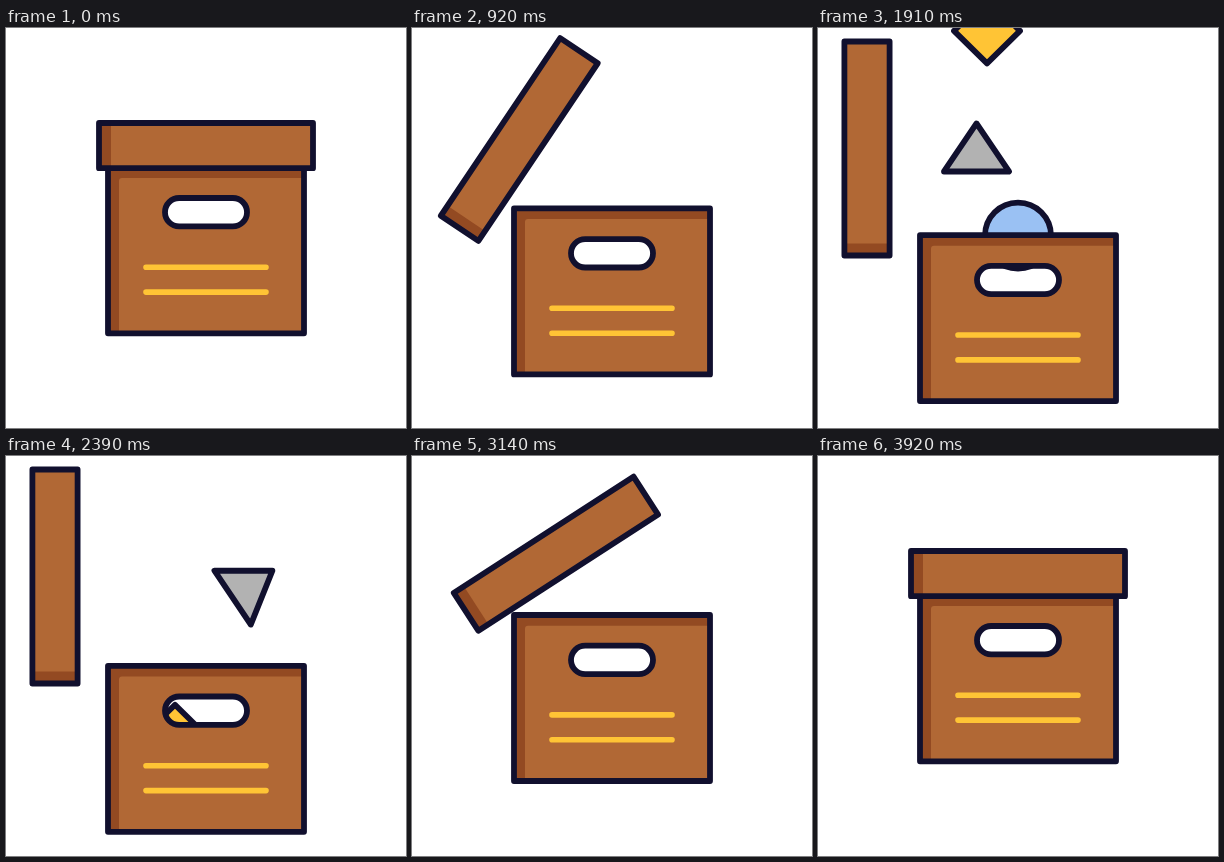
An HTML page for the animation above (3.95 s loop, 400 by 400 pixels).

```html
<!DOCTYPE html>
<html lang="en">
<head>
<meta charset="utf-8">
<title>Archive box</title>
<style>
  html, body { margin: 0; width: 100%; height: 100%; overflow: hidden; background: #fff; }
  svg { display: block; width: 100%; height: 100%; }
  .ink { stroke: #11102e; stroke-width: 5.8; stroke-linejoin: round; }
  .dark { fill: #934a22; }
  .wood { fill: #b16835; }
  .gold { fill: #ffc435; }
  .grey { fill: #b2b2b2; }
  .blue { fill: #9ac1f3; }
  .none { fill: none; }
  .label { stroke: #ffc435; stroke-width: 5.6; stroke-linecap: round; }
</style>
</head>
<body>
<svg viewBox="0 0 400 400">
  <defs>
    <path id="diamond" class="ink gold" d="M0-32.5L33 0 0 32.5-33 0z"/>
    <path id="triangle" class="ink grey" d="M0-24L32.5 24h-65z"/>
    <circle id="ball" class="ink blue" r="33"/>
  </defs>
  <g id="items"></g>
  <g id="box">
    <path class="dark" fill-rule="evenodd" d="M102 139.3H298V305.3H102z M173 170a14.2 14.2 0 0 0 0 28.4h54a14.2 14.2 0 0 0 0-28.4z"/>
    <path class="wood" fill-rule="evenodd" d="M113 305V153q0-3 3-3H298V305z M173 170a14.2 14.2 0 0 0 0 28.4h54a14.2 14.2 0 0 0 0-28.4z"/>
    <rect class="ink none" x="102" y="139.3" width="196" height="166"/>
    <rect class="ink none" x="159" y="170" width="82" height="28.4" rx="14.2"/>
    <path class="label" d="M140 239.2H260M140 264.1H260"/>
  </g>
  <g id="lid">
    <rect class="wood" x="-107" y="-22.6" width="214" height="45.2"/>
    <rect class="dark" x="-107" y="-22.6" width="12" height="45.2"/>
    <rect class="ink none" x="-107" y="-22.6" width="214" height="45.2"/>
  </g>
</svg>
<script>
const LOOP = 3950, FALL = 0.58, HIDDEN = 300;
const $ = id => document.getElementById(id);

// Smooth monotone curve through [time, value] points, flat at both ends.
function track(pts) {
  const rise = i => (pts[i + 1][1] - pts[i][1]) / (pts[i + 1][0] - pts[i][0]);
  const slopes = pts.map((_, i) => {
    if (!i || i === pts.length - 1) return 0;
    const a = rise(i - 1), b = rise(i);
    return a * b > 0 ? 2 * a * b / (a + b) : 0;
  });
  return t => {
    if (t <= pts[0][0]) return pts[0][1];
    const i = pts.findIndex(p => p[0] > t) - 1;
    if (i < 0) return pts[pts.length - 1][1];
    const [t0, v0] = pts[i], [t1, v1] = pts[i + 1];
    const d = t1 - t0, u = (t - t0) / d, w = 1 - u;
    return v0 * w * w * (1 + 2 * u) + v1 * u * u * (3 - 2 * u)
      + d * u * w * (slopes[i] * w - slopes[i + 1] * u);
  };
}

const boxY = track([[500, 0], [920, 41], [1040, 51], [1400, 63.5], [1580, 66], [1910, 67.8],
  [2120, 70.5], [2620, 70.5], [2870, 51.5], [3200, 14], [3410, 0]]);
const bump = track([[3430, 0], [3660, 5.5], [3740, 4], [3910, 0]]);

// Lid poses: time, centre x, centre y, angle
const poses = [
  [500, 200, 117.6, 0], [920, 107.5, 111.5, -56], [1040, 83.5, 113.5, -69.5],
  [1400, 54, 121, -87], [1580, 49, 120.5, -90], [2640, 49, 120.5, -90],
  [2870, 65, 110, -70], [3200, 160, 97, -25], [3410, 199.3, 112.6, -0.6], [3500, 200, 117.6, 0]
];
const [lidX, lidY, lidTurn] = [1, 2, 3].map(k => track(poses.map(p => [p[0], p[k]])));

// Falling items: shape, x, angle, time at which the centre crosses the top edge
const items = [
  ["diamond", 169, 0, 1097], ["triangle", 246.5, 56, 1364], ["ball", 200, 0, 1553],
  ["triangle", 158.5, 0, 1705], ["diamond", 169, 0, 1906], ["triangle", 246.5, 56, 2170]
].map(([shape, x, angle, start]) => {
  const node = document.createElementNS("http://www.w3.org/2000/svg", "use");
  node.setAttribute("href", "#" + shape);
  $("items").append(node);
  return { node, x, angle, start };
});

function place(node, x, y, angle = 0) {
  node.setAttribute("transform", `translate(${x} ${y}) rotate(${angle})`);
}

function draw(t) {
  const dip = bump(t);
  place($("box"), 0, boxY(t) + dip);
  place($("lid"), lidX(t), lidY(t) + dip, lidTurn(t));
  for (const { node, x, angle, start } of items) {
    const y = (t - start) * FALL;
    node.style.display = y > -45 && y < HIDDEN ? "" : "none";
    place(node, x, y, angle);
  }
}

const begin = performance.now();
function tick() {
  draw((performance.now() - begin) % LOOP);
  requestAnimationFrame(tick);
}
tick();
</script>
</body>
</html>
```
